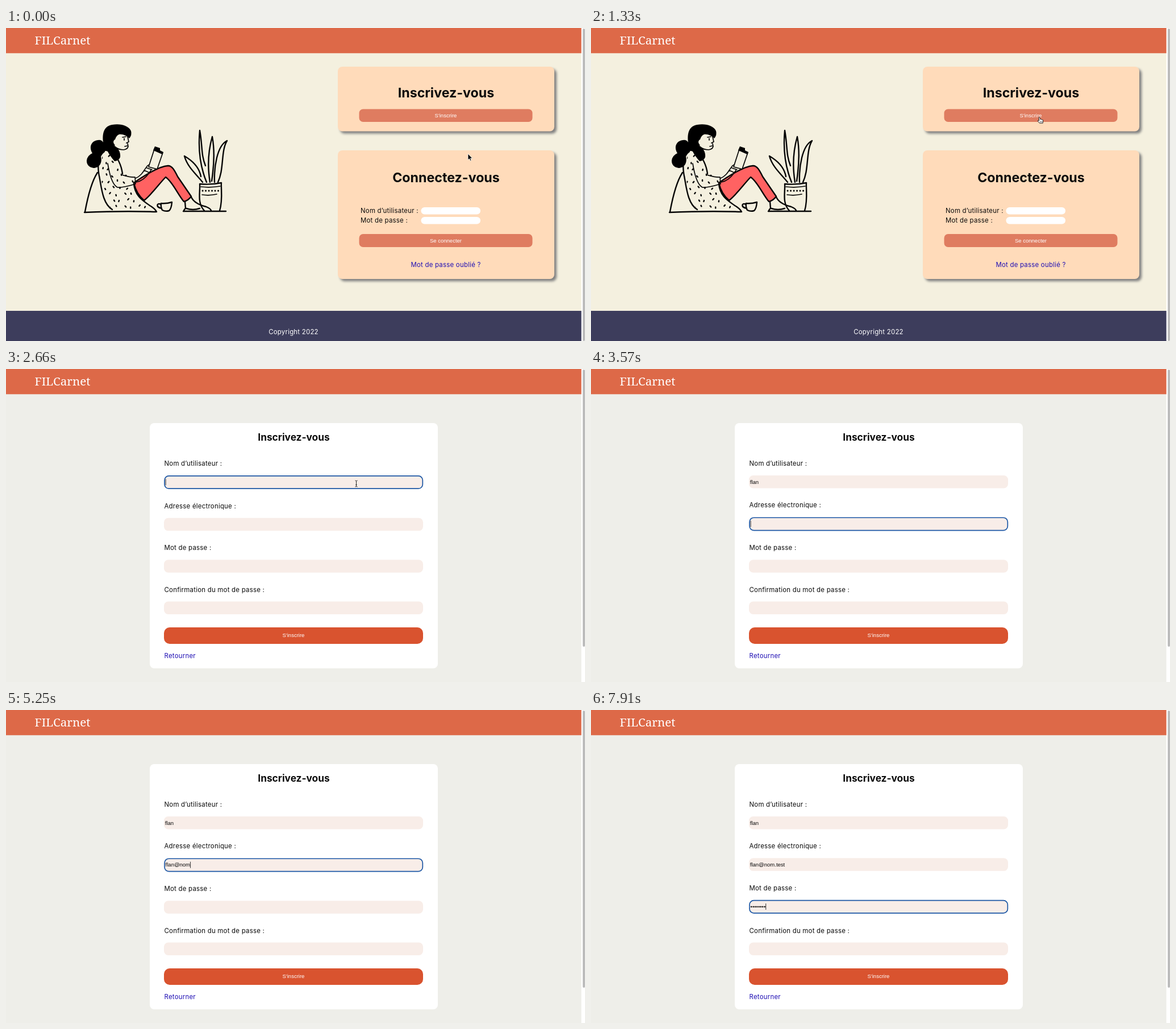
An HTML page that plays this animation: 1019x550 px, repeating every 8000 ms.

```html
<!DOCTYPE html>
<html lang="fr">
<head>
<meta charset="utf-8">
<title>Inscription</title>
<style>
  html, body { margin: 0; width: 100%; height: 100%; overflow: hidden; background: #eeeee9; }
  svg { display: block; width: 1019px; height: 550px; }
  text { font: 11.4px Inter, sans-serif; letter-spacing: .25px; fill: #0b0b0b; white-space: pre; }
  .mid { text-anchor: middle; }
  .brand { font: 500 20.6px "Noto Serif", serif; letter-spacing: 0; fill: #fff; }
  .title { font: 700 23.2px Inter, sans-serif; letter-spacing: 0; }
  .small { font-size: 17.3px; }
  .ui { font: 9.5px "Liberation Sans", Arial, sans-serif; letter-spacing: 0; }
  .white { fill: #fff; }
  .link { fill: #1f0fb4; }
  .card { fill: #ffdbba; filter: drop-shadow(4px 4px 2px #808080); }
  .ink { fill: none; stroke: #050505; stroke-width: 2.4; stroke-linecap: round; stroke-linejoin: round; }
  .thin { stroke-width: 1.7; }
  .paper { fill: #f4f0df; }
</style>
</head>
<body>
<svg viewBox="0 0 1019 550">
  <defs>
    <clipPath id="knit">
      <path d="M170 220L180 219L191 229L204 255L227 264L227 273L196 279L224 281L235 300L257 319L186 319L174 298L166 258Z"/>
    </clipPath>
  </defs>

  <g id="home">
    <rect width="1013" height="550" fill="#f4f0df"/>
    <rect y="497" width="1013" height="53" fill="#3d3d5c"/>
    <text class="mid white" x="506" y="538">Copyright 2022</text>

    <g id="reader">
      <path class="ink" d="M138 324Q205 321 264 323M312 322H387M161 254C151 269 144 296 139 323"/>
      <path class="ink" style="fill:#ff6262" d="M225 272C241 261 268 243 285 242C293 242 297 251 302 261L326 296C323 300 318 304 313 305C302 292 293 270 281 262C270 273 257 292 243 303Q229 291 225 272Z"/>
      <path class="ink" d="M315 305L316 317Q313 319 313 322M326 297C330 306 340 311 352 314Q360 317 361 321M317 317Q329 321 341 317"/>
      <path class="ink" d="M173 217C161 225 161 245 164 260C168 280 170 309 187 319M186 217C196 227 203 241 205 256M225 274C227 296 242 304 253 312Q262 317 265 323"/>
      <path class="ink thin" d="M179 238C182 257 187 275 196 280C206 281 218 277 228 274L227 262C218 263 211 260 204 258"/>
      <path class="ink thin" d="M228 264C239 260 243 249 249 242L256 238M229 271C240 269 249 260 255 250M248 246L257 249M243 250L252 254"/>
      <g id="dots" clip-path="url(#knit)"></g>
      <path class="ink thin paper" d="M261 213L276 219L266 248L251 244Z"/>
      <path d="M262 208L271 211L271 215L277 218L275 222L259 215Z"/>
      <path class="ink thin" d="M214 191L216 200L212 202M214 203L215 208Q214 213 207 214Q198 214 192 209M209 208L214 207M208 194V197M205 192L211 191M190 196Q186 201 191 206"/>
      <path d="M171 201C169 184 173 172 187 170C201 167 217 172 220 181Q222 188 217 194C213 190 206 186 199 187Q194 189 192 196C187 197 187 202 191 207C199 212 202 220 201 227Q198 234 191 234Q183 225 179 217C173 214 168 219 167 226C170 237 164 246 154 246Q142 244 142 233Q143 224 152 220C145 208 151 198 162 197Q168 196 171 201Z"/>
      <path class="ink" d="M273 308Q282 309 292 306Q291 318 287 321Q281 323 275 320Q272 315 273 308M273 310C265 306 263 315 274 317"/>
      <path class="ink" d="M341 274Q360 276 379 272C378 280 382 302 376 321M341 274C342 289 336 307 349 321"/>
      <path class="ink thin" d="M343 279Q360 281 377 278M345 293Q358 295 371 292"/>
      <path class="ink" style="stroke-width:3;stroke-dasharray:.1 5.4" d="M346 286H374"/>
      <path class="ink" d="M346 271C335 257 319 244 314 225C326 232 340 244 343 261M353 271C341 242 338 212 341 180C346 207 343 222 351 242M359 271C354 241 357 212 363 191C368 218 366 243 362 269M367 271C366 246 371 207 389 198C378 216 384 248 373 271"/>
    </g>

    <rect class="card" x="584" y="68" width="381" height="113.5" rx="8"/>
    <text class="title mid" x="774.5" y="122">Inscrivez-vous</text>
    <rect x="621.5" y="142.5" width="305" height="22.5" rx="7" fill="#df7c60"/>
    <text class="ui mid white" x="774" y="157">S'inscrire</text>

    <rect class="card" x="584" y="215" width="381" height="226" rx="8"/>
    <text class="title mid" x="774.5" y="271">Connectez-vous</text>
    <text x="624" y="324.7">Nom d’utilisateur :</text>
    <text x="624" y="341.7">Mot de passe :</text>
    <rect class="white" x="730.5" y="315" width="104.5" height="12.5" rx="6.2"/>
    <rect class="white" x="730.5" y="332" width="104.5" height="12.5" rx="6.2"/>
    <rect x="621.5" y="362" width="305" height="23" rx="7" fill="#df7c60"/>
    <text class="ui mid white" x="774" y="376.7">Se connecter</text>
    <text class="mid link" x="774" y="419.7">Mot de passe oublié ?</text>
  </g>

  <g id="signup">
    <rect width="1013" height="550" fill="#eeeee9"/>
    <rect class="white" x="253" y="95" width="507" height="431" rx="8"/>
    <text class="title small mid" x="506.5" y="126">Inscrivez-vous</text>
    <g id="fields"></g>
    <rect id="caret" width="1" height="11" fill="#333"/>
    <rect x="278" y="454" width="456" height="29" rx="10" fill="#d9532f"/>
    <text class="ui mid white" x="506" y="471.2">S'inscrire</text>
    <text class="link" x="278.5" y="508">Retourner</text>
  </g>

  <rect width="1013" height="44.3" fill="#dd6948"/>
  <text class="brand" x="50.5" y="28.7">FILCarnet</text>
  <rect class="white" x="1012.6" width="7" height="550"/>
  <rect id="thumb" x="1015" y="1" width="4" rx="2" fill="#bcbcbc"/>

  <g id="arrow">
    <path d="M0 0V11L2.5 8.7L4.2 12.4L6 11.6L4.4 8H7.7Z" stroke="#fff" stroke-width=".8"/>
  </g>
  <g id="hand">
    <path d="M-.9 .6Q.2-.7 1.1 .6L1.8 4Q3 3.2 3.6 4.4Q4.7 3.7 5.3 4.9Q6.7 4.6 6.7 6.2L6.2 10.7H.4L-2.9 6.6Q-2.4 5-.3 6.3Z" fill="#fff" stroke="#111" stroke-width=".9"/>
    <path d="M1.4 7V9.4M3.1 7V9.4M4.8 7V9.4" stroke="#111" stroke-width=".6"/>
  </g>
  <g id="beam">
    <path d="M-2-5.5Q0-5.5 0-4Q0-5.5 2-5.5M0-4V4M-2 5.5Q0 5.5 0 4Q0 5.5 2 5.5M-1.2 2H1.2" fill="none" stroke="#222"/>
  </g>
</svg>
<script>
const LOOP = 8000, TICK = 70, OPEN = 1400, HIDE = 2800, BLINK = 500;
const $ = id => document.getElementById(id);
const show = (el, on) => el.setAttribute('visibility', on ? 'visible' : 'hidden');

function add(parent, tag, attrs) {
  const el = document.createElementNS('http://www.w3.org/2000/svg', tag);
  set(el, attrs);
  return parent.appendChild(el);
}
function set(el, attrs) {
  for (const k in attrs) el.setAttribute(k, attrs[k]);
}

// Short slanted flecks on the sweater
for (let row = 0; row < 9; row++) {
  for (let col = 0; col < 8; col++) {
    const x = 169 + col * 13 + (row % 2) * 6 + Math.sin(row * 7 + col * 3) * 2;
    const y = 225 + row * 11 + Math.cos(row * 5 + col * 4) * 2;
    const dx = Math.sin(row * 3 + col * 5) * 1.6;
    add($('dots'), 'path', { class: 'ink', d: `M${x} ${y}l${dx} 1.8` });
  }
}

const fields = [
  { label: 'Nom d’utilisateur :', text: 'flan', focus: 1390, keys: [2800, 3150, 3290, 3360] },
  { label: 'Adresse électronique :', text: 'flan@nom.test', focus: 3570,
    keys: [3920, 4060, 4130, 4270, 4480, 4760, 4900, 5110, 5530, 5670, 5810, 5880, 5950] },
  { label: 'Mot de passe :', text: '•'.repeat(8), focus: 6090,
    keys: [6650, 6720, 7000, 7070, 7140, 7350, 7700, 7840] },
  { label: 'Confirmation du mot de passe :', text: '', focus: Infinity, keys: [] }
];
for (const f of fields) {
  f.name = add($('fields'), 'text', { x: 278.5 });
  f.name.textContent = f.label;
  f.box = add($('fields'), 'rect', { fill: '#f8ede8' });
  f.value = add($('fields'), 'text', { class: 'ui' });
}

// Cursor hotspot: time, x, y
const path = [
  [0, 813, 221], [280, 810, 209], [630, 798, 176], [910, 791, 159], [1260, 789, 156.5],
  [1610, 789, 156.5], [1890, 745, 175], [2030, 745, 175], [2450, 640, 199],
  [2520, 640, 199], [2660, 616.5, 201.5], [LOOP, 616.5, 201.5]
];
function cursorAt(t) {
  const i = path.findIndex(p => p[0] > t);
  const [a, b] = [path[i - 1], path[i]];
  const k = (t - a[0]) / (b[0] - a[0]);
  return [a[1] + (b[1] - a[1]) * k, a[2] + (b[2] - a[2]) * k];
}

function drawCursor(t) {
  const [x, y] = cursorAt(t);
  let kind = 'arrow';
  if (t < OPEN ? y < 165 : t < 1680) kind = 'hand';
  else if (t > OPEN && x < 734 && y > 187) kind = 'beam';
  for (const id of ['arrow', 'hand', 'beam']) show($(id), id === kind && t < HIDE);
  set($(kind), { transform: `translate(${x} ${y})` });
}

function drawForm(t) {
  const active = fields.filter(f => f.focus <= t).length - 1;
  fields.forEach((f, i) => {
    const on = i === active;
    const shift = i * 73.35 + (i > active ? 1.5 : 0);
    const top = 187 + shift;
    const typed = f.keys.filter(k => k <= t);
    set(f.name, { y: 170 + shift });
    set(f.box, on
      ? { x: 279, y: top + .9, width: 454.3, height: 22.3, rx: 7.5, stroke: '#1d57a5', 'stroke-width': 1.7 }
      : { x: 278, y: top, width: 456, height: 22.5, rx: 7.5, stroke: 'none' });
    const x = on ? 280.6 : 279.8;
    set(f.value, { x, y: top + (on ? 15.1 : 14.6) });
    f.value.textContent = f.text.slice(0, typed.length);
    if (on) {
      const width = typed.length ? f.value.getComputedTextLength() : 0;
      const last = typed.length ? typed[typed.length - 1] : f.focus;
      set($('caret'), { x: x + width, y: top + 6.3 });
      show($('caret'), Math.floor((t - last) / BLINK) % 2 === 0);
    }
  });
}

function frame() {
  const now = performance.now() % LOOP;
  const t = Math.floor(now / TICK) * TICK;
  const form = t >= OPEN;
  $('home').style.display = form ? 'none' : '';
  $('signup').style.display = form ? '' : 'none';
  set($('thumb'), { height: form ? 487 : 549 });
  show($('caret'), false);
  if (form) drawForm(t);
  drawCursor(t);
  requestAnimationFrame(frame);
}
frame();
</script>
</body>
</html>
```
